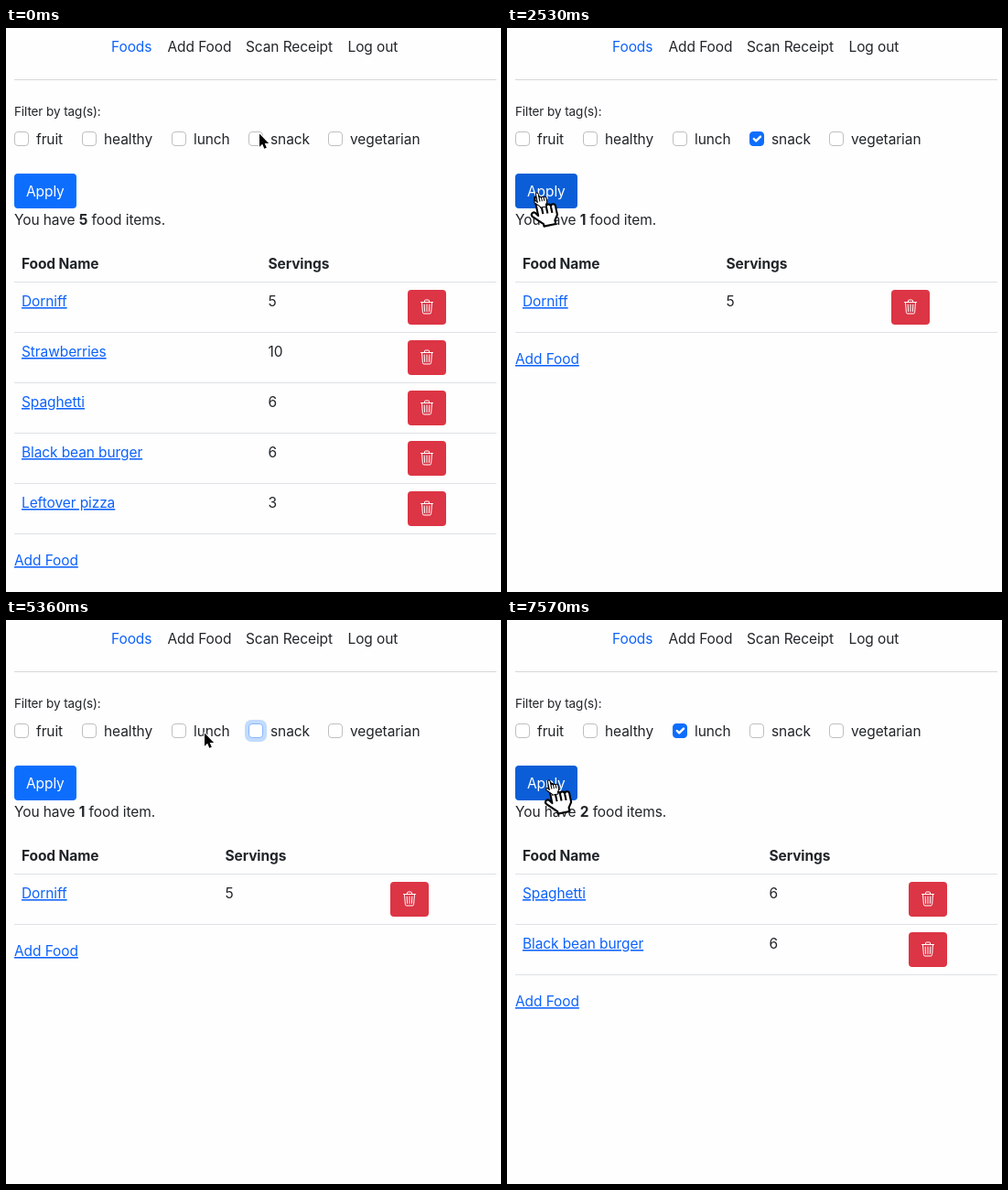
These frames come from a looping animation (541x616 px, 8 s). An HTML page:

```html
<!DOCTYPE html>
<html lang="en">
<head>
<meta charset="utf-8">
<title>Foods</title>
<style>
  html, body { margin: 0; width: 100%; height: 100%; overflow: hidden; background: #fefefe; }
  svg { display: block; }
  text { font: 15.5px Inter, "Open Sans", sans-serif; letter-spacing: -.1px; fill: #212529; white-space: pre; }
  .small { font-size: 13.5px; }
  .bold { font-weight: 700; }
  .active, .link { fill: #0d62fd; }
  .link { text-decoration: underline; text-decoration-thickness: 1px; text-underline-offset: 2px; }
  .light { fill: #fff; }
  .rule { fill: #dee2e6; }
  .box { fill: #fff; stroke: #bfbfbf; }
  .ring { fill: #c2dbfe; visibility: hidden; }
  .tick { fill: none; stroke: #fff; stroke-width: 2.4; stroke-linecap: round; stroke-linejoin: round; visibility: hidden; }
  .focus .ring { visibility: visible; }
  .focus .box { stroke: #86b7fe; }
  .on .box { fill: #0d6efd; stroke: #0d6efd; }
  .on .tick { visibility: visible; }
  #apply .ring { fill: #86b6fe; }
  .face { fill: #0d6efd; }
  .hover .face { fill: #0b5ed7; }
  .bin { fill: none; stroke: #fff; stroke-linecap: round; stroke-linejoin: round; }
  .hand { fill: #fff; stroke: #000; stroke-linejoin: round; }
  .arrow { fill: #000; stroke: #fff; stroke-width: 1.8; paint-order: stroke; stroke-linejoin: round; }
</style>
</head>
<body>
<svg id="stage" width="541" height="616" viewBox="0 0 541 616">
  <defs>
    <g id="trash">
      <rect width="42" height="38" rx="4" fill="#dc3545"/>
      <path class="bin" transform="translate(13 10.5)" d="M1.5 3h13M5.5 3V1.5a1 1 0 0 1 1-1h3a1 1 0 0 1 1 1V3M2.5 3l.9 11.1a1.5 1.5 0 0 0 1.5 1.4h6.2a1.5 1.5 0 0 0 1.5-1.4l.9-11.1M5.2 5.5l.4 7.5M8 5.5v7.5M10.8 5.5l-.4 7.5"/>
    </g>
    <g id="paw" class="hand" transform="rotate(-12) translate(-5.3 -1)">
      <path d="M4 11V2.3a1.3 1.3 0 0 1 2.6 0V7a1.2 1.2 0 0 1 2.4.2a1.2 1.2 0 0 1 2.4.4a1.2 1.2 0 0 1 2.4.5v4.4L12 15v2H5.8v-1.2L1 10.8a1.2 1.2 0 0 1 1.8-1.6z"/>
      <path d="M6.6 7v3.6M9 7.4v3.4M11.4 8v3" fill="none"/>
    </g>
  </defs>
  <g id="page"></g>
  <g id="apply">
    <rect class="ring" x="5" y="155" width="76" height="46" rx="8"/>
    <rect class="face" x="9" y="159" width="68" height="38" rx="4"/>
    <text class="light" x="22" y="184">Apply</text>
  </g>
  <g id="lists"></g>
  <g id="cursor">
    <path id="arrow" class="arrow" d="M0 0V14.2l3.2-3 2.1 5.1 2.5-1-2.1-4.9h4.4z"/>
    <g id="hand">
      <g id="big"><use href="#paw" transform="scale(2.1)"/></g>
      <use href="#paw" transform="scale(1.05)"/>
    </g>
  </g>
</svg>
<script>
const LOOP = 8000;
const $ = id => document.getElementById(id);
const text = (x, y, s, cls = '') => `<text x="${x}" y="${y}" class="${cls}">${s}</text>`;
const rule = y => `<rect class="rule" x="9" y="${y}" width="527" height="1"/>`;

const checkbox = (name, x) => `<g id="${name}">
  <rect class="ring" x="${x - 4}" y="109" width="24" height="24" rx="7"/>
  <rect class="box" x="${x + .5}" y="113.5" width="15" height="15" rx="3.5"/>
  <path class="tick" d="M${x + 4.8} 121l2.4 2.4 4.8-4.8"/>
  ${text(x + 24, 127, name)}</g>`;

$('page').innerHTML =
  text(115, 26, 'Foods', 'active') + text(176.5, 26, 'Add Food') +
  text(262, 26, 'Scan Receipt') + text(373.5, 26, 'Log out') +
  '<rect x="9" y="56" width="527" height="1" fill="#d6d7d8"/>' +
  text(9, 96, 'Filter by tag(s):', 'small') +
  checkbox('fruit', 9) + checkbox('healthy', 83) + checkbox('lunch', 181) +
  checkbox('snack', 265) + checkbox('vegetarian', 352);

// A food table: column positions depend on the widest name
function table(foods, servingsX, binX) {
  const n = foods.length;
  const rows = foods.map(([name, servings], i) => {
    const y = 277 + 55 * i;
    return text(17, y + 27, name, 'link') + text(servingsX, y + 27, servings) +
      `<use href="#trash" x="${binX}" y="${y + 9}"/>` + rule(y + 55);
  }).join('');
  return '<g>' +
    text(9, 215, `You have <tspan class="bold">${n}</tspan> food item${n > 1 ? 's' : ''}.`) +
    text(17, 263, 'Food Name', 'bold') + text(servingsX, 263, 'Servings', 'bold') +
    rule(277) + rows + text(9, 312 + 55 * n, 'Add Food', 'link') + '</g>';
}

const foods = [['Dorniff', 5], ['Strawberries', 10], ['Spaghetti', 6],
  ['Black bean burger', 6], ['Leftover pizza', 3]];
$('lists').innerHTML = table(foods, 286.5, 439) +
  table(foods.slice(0, 1), 239.5, 420) + table(foods.slice(2, 4), 286.5, 439);

// Pointer legs: first step, last step, step count, destination
const start = [277, 115.5];
const legs = [
  [450, 750, 3, 273, 121],
  [1040, 1790, 6, 32.5, 180],
  [2980, 3720, 6, 272, 117.5],
  [4170, 4170, 1, 274, 99],
  [4620, 4770, 2, 272, 118.5],
  [5060, 5360, 3, 217, 123.5],
  [5500, 5650, 2, 188, 124],
  [5950, 6390, 4, 56, 163.5],
  [6540, 6980, 4, 45.5, 175]
];
const ease = p => p * p * (3 - 2 * p);

function pointer(t) {
  let [x, y] = start;
  for (const [t0, t1, n, toX, toY] of legs) {
    if (t < t0) break;
    const gap = (t1 - t0) / (n - 1) || 1;
    const p = ease(Math.min(n, Math.floor((t - t0) / gap + 1e-6) + 1) / n);
    x += (toX - x) * p;
    y += (toY - y) * p;
  }
  return [x, y];
}

const within = (t, ...spans) => spans.some(([a, b]) => t >= a && t < b);
const flag = (id, cls, on) => $(id).classList.toggle(cls, on);
const show = (el, on) => { el.style.display = on ? '' : 'none'; };

function draw(t) {
  flag('snack', 'on', within(t, [600, 5060]));
  flag('snack', 'focus', within(t, [600, 1790], [5060, 5950]));
  flag('lunch', 'on', t >= 5950);
  flag('lunch', 'focus', within(t, [5950, 6980]));
  flag('apply', 'focus', within(t, [1790, 2530], [6980, 7570]));

  const list = t < 2530 ? 0 : t < 7570 ? 1 : 2;
  [...$('lists').children].forEach((el, i) => show(el, i === list));

  const [x, y] = pointer(t);
  const over = x >= 9 && x <= 77 && y >= 159 && y <= 197;
  flag('apply', 'hover', over);
  show($('arrow'), !over);
  show($('hand'), over);
  $('cursor').setAttribute('transform', `translate(${x} ${y})`);
  // the large hand trails slightly to the right
  $('big').setAttribute('transform', `translate(${(x - 32.5) * .17} 4)`);
}

const began = performance.now();
function tick() {
  draw((performance.now() - began) % LOOP);
  requestAnimationFrame(tick);
}
tick();
</script>
</body>
</html>
```
